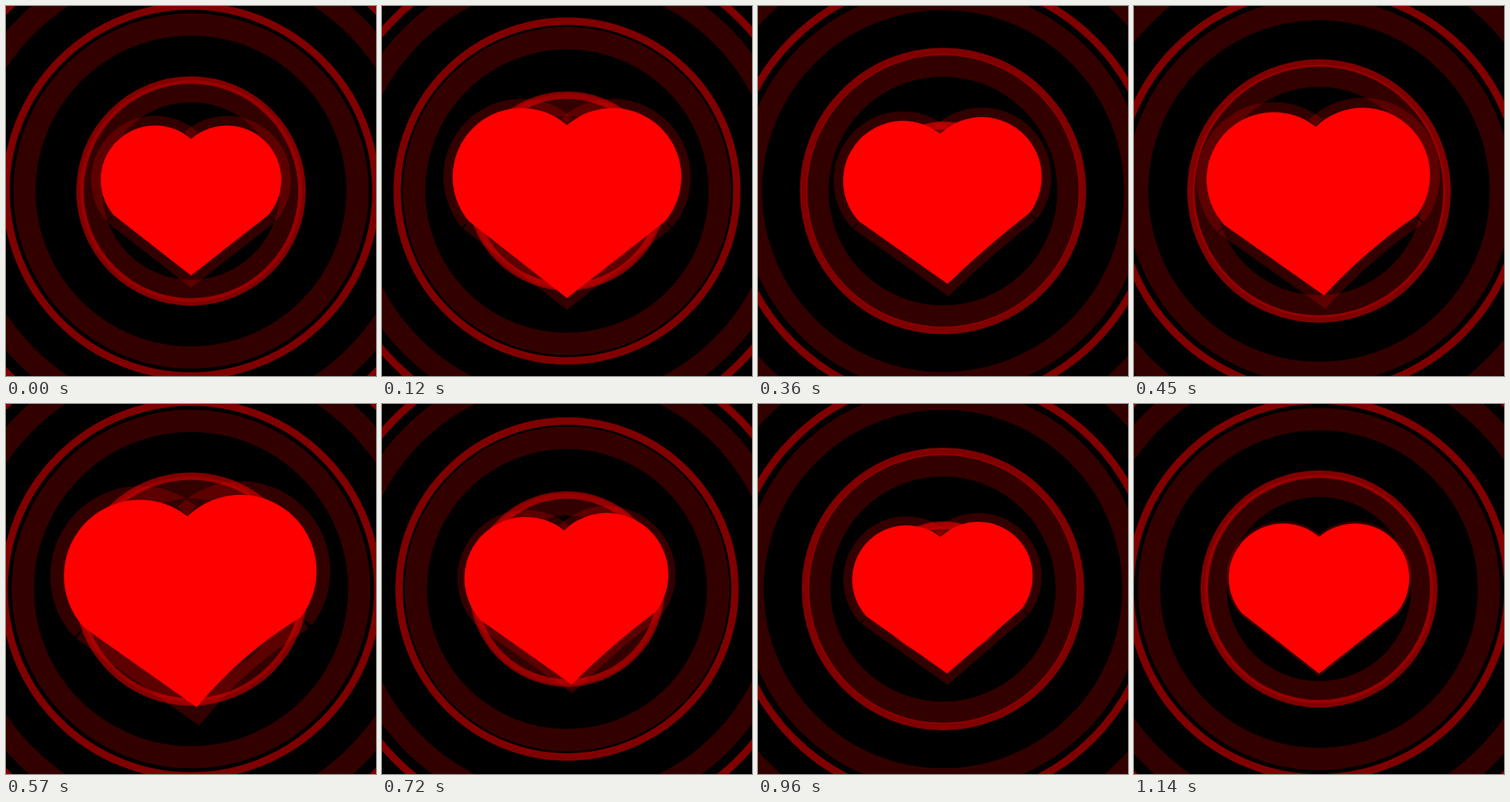
Recreate the animation shown at these times as an HTML page with a canvas. Size 500x500 px, loop 1.17 s.

```html
<!DOCTYPE html>
<html lang="en">
<head>
<meta charset="utf-8">
<title>Beating heart</title>
<style>
  html, body { margin: 0; width: 100%; height: 100%; overflow: hidden; background: #000; }
  canvas { display: block; }
</style>
</head>
<body>
<canvas id="stage" width="500" height="500"></canvas>
<script>
const ctx = document.getElementById('stage').getContext('2d');
const STEP = 30, STEPS = 39;
const RAD = Math.PI / 180;

// [step, value] pairs, joined by straight ramps
const SCALE = [[0, 1], [6, 1.4], [8, 1.305], [12, 1.1], [15, 1.238], [19, 1.4], [24, 1.13], [27, 1], [39, 1]];
const GLOW = [[0, 13], [8, 12], [15, 13.5], [19, 18.5], [24, 9.5], [32, 12], [38, 3]];

// Heart built from two round lobes and a V
const LOBE = { x: 48.5, y: -15, r: 73.5 };
const TIP = 114.3;
const CORNER = 140 * RAD;
const CLEFT = -Math.acos(LOBE.x / LOBE.r);

function ramp(keys, n) {
  const i = keys.findIndex(k => k[0] > n);
  if (i < 0) return keys[keys.length - 1][1];
  const [a, from] = keys[i - 1], [b, to] = keys[i];
  return from + (to - from) * (n - a) / (b - a);
}

function rings(first, gap, travel, width, alpha) {
  ctx.lineWidth = width;
  ctx.strokeStyle = `rgba(255,0,0,${alpha})`;
  for (let r = ((first - travel) % gap + gap) % gap; r < 380; r += gap) {
    ctx.beginPath();
    ctx.arc(0, 0, r, 0, 2 * Math.PI);
    ctx.stroke();
  }
}

function leftLobe(path, s) {
  path.arc(-LOBE.x * s, LOBE.y * s, LOBE.r * s, CORNER, CLEFT);
}

function rightLobe(path, s) {
  path.arc(LOBE.x * s, LOBE.y * s, LOBE.r * s, Math.PI - CLEFT, Math.PI - CORNER);
}

function vee(path, s, bend) {
  const x = (LOBE.x - LOBE.r * Math.cos(CORNER)) * s;
  const y = (LOBE.y + LOBE.r * Math.sin(CORNER)) * s;
  const tip = TIP * s;
  path.lineTo(x, y);
  path.quadraticCurveTo(x / 2 - 1.2 * bend, (y + tip) / 2 - 1.6 * bend, 0, tip);
  path.lineTo(-x, y);
}

function heart(n) {
  const s = ramp(SCALE, n);
  const tilted = n >= 12 && n < 36;
  const bend = tilted ? 20 * (s - 1) : 0;
  const parts = [leftLobe, rightLobe, vee];

  ctx.save();
  if (tilted) ctx.rotate(-2.8 * RAD);
  ctx.lineWidth = 2 * ramp(GLOW, n);
  ctx.strokeStyle = 'rgba(255,0,0,0.2)';
  for (const part of parts) {
    const path = new Path2D();
    part(path, s, bend);
    ctx.stroke(path);
  }
  const body = new Path2D();
  for (const part of parts) part(body, s, bend);
  ctx.fillStyle = '#f00';
  ctx.fill(body);
  ctx.restore();
}

function draw(now) {
  const n = Math.floor(now / STEP) % STEPS;
  const t = n / STEPS;
  ctx.setTransform(1, 0, 0, 1, 0, 0);
  ctx.fillStyle = '#000';
  ctx.fillRect(0, 0, 500, 500);
  ctx.translate(250, 250);
  rings(135, 90, 180 * t, 30, 0.2);
  rings(150, 100, 200 * t, 10, 0.5);
  heart(n);
}

const start = performance.now();
function tick() {
  draw(performance.now() - start);
  requestAnimationFrame(tick);
}
tick();
</script>
</body>
</html>
```
